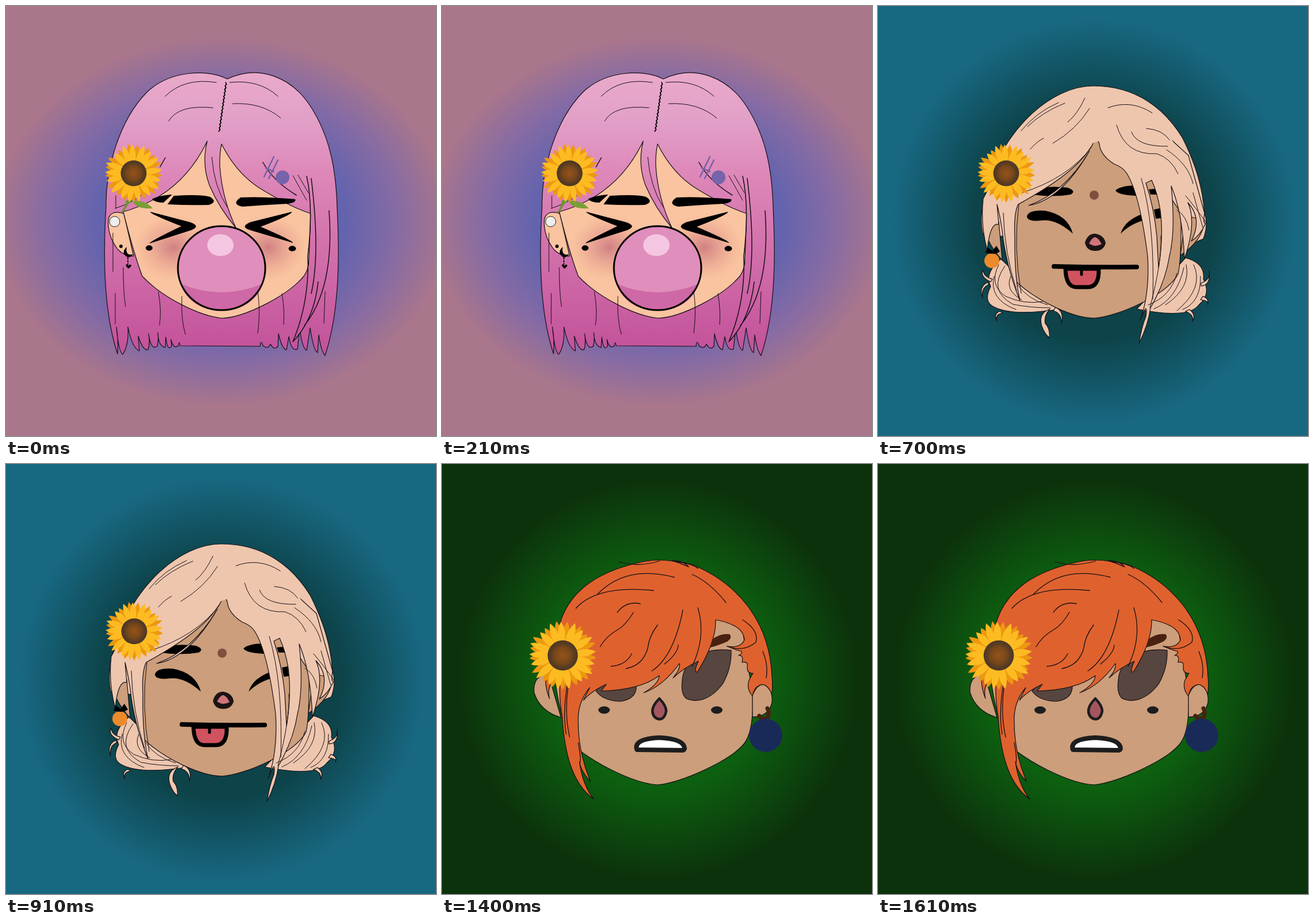
Recreate the animation shown at these times as an HTML page. Size 748 by 748 pixels, loop 1.75 s.

```html
<!DOCTYPE html>
<html lang="en">
<head>
<meta charset="utf-8">
<title>Flower portraits</title>
<style>
html, body { margin: 0; width: 100%; height: 100%; overflow: hidden; }
svg { display: block; width: 100vw; height: 100vh; }
.scene { visibility: hidden; animation: show 1750ms step-end infinite; animation-delay: calc(var(--i) * 350ms); }
@keyframes show { 0% { visibility: visible; } 20%, 100% { visibility: hidden; } }
path { stroke-linejoin: round; stroke-linecap: round; }
.o { stroke: #161016; stroke-width: 1.2; }
.b { stroke: #000; stroke-width: 2; }
.l { fill: none; stroke: #161016; stroke-width: 1; }
.m { fill: none; stroke: #000; stroke-width: 1.8; }
</style>
</head>
<body>
<svg viewBox="0 0 748 748">
<defs>
  <radialGradient id="bg0" gradientUnits="userSpaceOnUse" cx="0" cy="0" r="1" gradientTransform="translate(376 375) scale(395 322)">
    <stop offset=".54" stop-color="#6363ae"/><stop offset=".77" stop-color="#866ba4"/><stop offset="1" stop-color="#aa768b"/>
  </radialGradient>
  <radialGradient id="bg1" gradientUnits="userSpaceOnUse" cx="376" cy="375" r="372">
    <stop offset=".54" stop-color="#2b00d4"/><stop offset="1" stop-color="#8b0073"/>
  </radialGradient>
  <radialGradient id="bg2" gradientUnits="userSpaceOnUse" cx="376" cy="375" r="352">
    <stop offset=".58" stop-color="#0d4349"/><stop offset="1" stop-color="#186882"/>
  </radialGradient>
  <radialGradient id="bg3" gradientUnits="userSpaceOnUse" cx="376" cy="375" r="354">
    <stop offset=".48" stop-color="#9a3e67"/><stop offset="1" stop-color="#830118"/>
  </radialGradient>
  <radialGradient id="bg4" gradientUnits="userSpaceOnUse" cx="376" cy="375" r="348">
    <stop offset=".54" stop-color="#0d6010"/><stop offset="1" stop-color="#0c320c"/>
  </radialGradient>
  <linearGradient id="pink" gradientUnits="userSpaceOnUse" x1="0" y1="120" x2="0" y2="600">
    <stop offset="0" stop-color="#e9a9ca"/><stop offset=".16" stop-color="#e2a0c8"/><stop offset=".35" stop-color="#de88b9"/><stop offset="1" stop-color="#c3529a"/>
  </linearGradient>
  <linearGradient id="ash" gradientUnits="userSpaceOnUse" x1="0" y1="170" x2="0" y2="360">
    <stop offset="0" stop-color="#63564a"/><stop offset=".3" stop-color="#6e6054"/><stop offset="1" stop-color="#9a8271"/>
  </linearGradient>
  <radialGradient id="blush">
    <stop offset="0" stop-color="#c9747f" stop-opacity=".85"/><stop offset="1" stop-color="#e59a8b" stop-opacity="0"/>
  </radialGradient>
  <radialGradient id="seed">
    <stop offset="0" stop-color="#95531d"/><stop offset=".55" stop-color="#774719"/><stop offset=".75" stop-color="#5d3d20"/><stop offset="1" stop-color="#493727"/>
  </radialGradient>
  <g id="flower"><g id="petals"/><circle r="22.5" fill="url(#seed)"/></g>
  <path id="ear" class="o" d="M205 361Q182 354 178 371Q176 400 195 424Q207 436 222 435Z" fill="#fac4a0"/>
</defs>

<g class="scene" style="--i:0">
  <rect width="748" height="748" fill="url(#bg0)"/>
  <path class="o" fill="url(#pink)" d="M385 127C350 109 285 112 245 150C196 200 173 285 174 350C169 430 169 530 194 605Q196 580 192 558Q196 602 203 606Q214 590 212 558Q220 596 232 600L230 574Q238 600 247 598Q251 588 248 570Q252 600 263 592Q266 580 264 568Q265 592 277 594L278 576Q281 602 288 592L287 580Q291 598 300 591Q301 580 303 591L442 592Q443 578 447 591Q456 598 460 588Q466 600 473 592L474 570Q480 597 488 598L492 575Q496 601 507 597L511 560Q515 596 523 599L529 560Q535 600 542 603L544 572Q548 600 555 608C581 530 580 430 576 350C574 280 562 225 530 175C498 125 440 100 385 127Z"/>
  <use href="#ear"/>
  <path class="o" fill="#fac4a0" d="M204 358Q305 330 350 235Q340 275 354 312Q371 352 400 386Q376 335 372 280Q371 258 375 240Q400 290 440 316Q495 350 530 361L527 440Q527 458 518 470C490 504 415 542 376 543C340 540 275 510 237 470Q222 430 204 358Z"/>
  <ellipse cx="291" cy="420" rx="68" ry="58" fill="url(#blush)"/>
  <ellipse cx="456" cy="420" rx="66" ry="58" fill="url(#blush)"/>
  <path d="M254 336Q264 330 289 328L274 342Q260 342 254 336ZM292 330Q340 327 355 332Q369 341 353 346Q318 347 281 345ZM408 333Q445 331 503 336Q506 342 490 344Q450 346 411 349Q391 345 408 333ZM251 358L320 376Q340 383 322 390L250 413Q247 411 305 383Q249 361 251 358ZM497 358L425 376Q406 384 425 390L499 412Q501 409 443 384Q500 362 497 358Z"/>
  <ellipse cx="249" cy="421" rx="6" ry="4.7"/><ellipse cx="498" cy="422" rx="6.5" ry="4.7"/>
  <ellipse cx="375" cy="456" rx="76" ry="73" fill="#e08ebb"/>
  <path fill="#ce68a6" d="M303 483Q375 513 447 483Q430 529 375 529Q320 529 303 483Z"/>
  <ellipse cx="375" cy="456" rx="76" ry="73" fill="none" stroke="#000" stroke-width="3"/>
  <ellipse cx="373" cy="416" rx="23" ry="19" fill="#f5c6e1"/>
  <path fill="url(#pink)" d="M523 298Q535 350 528 430Q528 510 499 584Q535 545 548 490L563 355L535 300Z"/>
  <path class="l" d="M277 157Q310 124 366 133M283 200Q300 171 360 177M389 133Q440 127 473 157M394 170Q445 167 478 195M358 263Q362 315 385 350M190 500V553M186 395V462M204 455Q204 500 208 523M265 497Q271 530 267 555M306 505Q304 545 312 571M438 497Q443 530 438 569M480 500Q485 530 483 554M555 497L553 552M499 295L523 338M508 294L526 325M191 330V352M190 352Q215 344 235 330"/>
  <path class="l" style="stroke-width:1.5" d="M523 296Q535 350 525 435Q528 515 499 584Q536 545 543 480M531 300Q547 430 531 500M562 356Q572 490 519 556M277 264L268 280M447 272Q465 305 505 329"/>
  <path id="parting" class="m"/>
  <path fill="none" stroke="#765fa9" stroke-width="2.5" d="M466 262L449 297M473 268L457 300M452 282L466 288"/>
  <circle cx="481" cy="298" r="12" fill="#7663aa"/>
  <circle cx="189" cy="375" r="9" fill="#eee" stroke="#222"/>
  <circle cx="200" cy="418" r="3"/>
  <path d="M210 419Q199 429 211 437Q217 438 221 432Q207 435 210 419ZM213 457Q206 451 210 449Q213 450 213 452Q216 448 218 451Q218 453 213 457Z"/>
  <path class="m" stroke-dasharray="2 3" d="M212 438V449"/>
  <path fill="#6b9432" d="M209 338Q207 351 199 360L206 357Q210 346 220 338Z"/>
  <path fill="#7b9e37" d="M219 338Q226 354 255 352Q244 338 219 338Z"/>
  <use href="#flower" x="222" y="291"/>
</g>

<g class="scene" style="--i:1">
  <rect width="748" height="748" fill="url(#bg1)"/>
  <g fill="#662d91" class="b">
    <path d="M203 398Q163 407 146 500Q135 570 158 656Q149 600 152 550Q155 470 193 408Z"/>
    <path d="M574 410Q612 425 628 500Q646 580 617 652Q631 590 626 545Q615 450 583 413Z"/>
    <path d="M203 398Q168 430 163 520C160 580 158 640 170 690Q168 650 172 655Q173 705 184 720Q185 690 180 660L191 691Q205 640 197 682Q230 640 238 575Q242 600 235 623Q246 590 241 540L222 410Z"/>
    <path d="M574 410Q606 440 611 520C615 580 612 640 603 686Q605 660 602 655Q613 660 607 682Q604 655 600 650Q599 705 587 713Q592 690 584 670L578 686Q542 640 527 582Q520 600 528 622Q516 595 524 540L558 410Z"/>
    <path fill="#c1272d" d="M207 370Q190 376 194 396Q198 410 210 411ZM560 383Q576 379 576 394Q574 420 565 422Q557 415 560 383Z"/>
    <path d="M202 282C215 190 280 132 350 132Q378 131 393 136C440 126 505 155 535 205C562 255 577 315 571 378L562 390L210 390Z"/>
  </g>
  <path class="o" fill="#fac4a0" d="M237 366Q233 460 243 481C280 515 340 543 376 543C410 541 490 505 519 470Q527 460 527 430Q530 380 512 325L255 290Z"/>
  <path id="freckles" stroke="#d8a67f" stroke-width=".8"/>
  <path class="b" fill="#662d91" d="M253 289C268 235 320 198 380 198C450 200 495 245 511 325L508 363L497 360L486 332Q484 352 483 357L464 353Q460 342 450 337L460 353L441 349L422 328L429 347L401 346L392 323L389 345L364 345L361 319L354 345L345 347L347 328L338 348L331 344L329 349L308 350L312 335L307 350L296 350L300 336L289 355L292 337L272 358L277 342L269 357L239 363Q251 330 253 289Z"/>
  <path fill="#662d91" d="M253 289Q229 380 243 480Q258 530 290 569Q257 553 237 505Q248 565 276 591Q225 563 211 480L205 300Z"/>
  <path fill="#662d91" d="M511 320Q529 390 527 430Q528 450 519 480Q500 540 461 571Q505 555 526 505Q515 565 485 590Q540 560 555 470L562 385L535 280Z"/>
  <path class="m" d="M237 366Q230 430 243 480Q258 530 290 569Q257 553 237 505Q248 565 276 591Q225 563 213 470L207 412M511 325Q530 395 527 437Q528 455 519 480Q500 540 461 571Q505 555 526 505Q515 565 485 590Q540 560 555 470Q565 400 559 340Q555 320 546 313M524 302Q540 360 535 420M271 290Q250 320 246 362M221 383Q222 460 239 522M319 234L309 306M366 233Q352 265 348 310M387 237L393 308M436 237Q448 280 466 315M462 270Q475 325 487 335M471 270Q485 300 497 325"/>
  <path class="m" d="M190 420Q163 460 164 510Q165 555 183 610M205 480Q220 520 208 560Q200 610 191 655M215 540Q208 580 212 619M222 560L221 610M185 430Q165 550 166 600Q165 645 171 684M580 428Q594 500 580 610M558 478Q543 515 560 568Q571 620 578 672M552 540L553 620M542 560L543 598M536 480Q550 530 530 575"/>
  <path class="l" d="M323 148Q345 136 379 139M320 165Q345 154 377 155M323 191Q340 181 371 183M398 147Q425 144 442 150M395 168Q425 170 441 178"/>
  <path id="zip" class="m"/>
  <path d="M274 376L332 375Q337 421 315 436Q303 443 290 434Q270 417 274 376ZM424 372L482 373Q486 418 466 433Q451 441 437 431Q419 410 424 372Z"/>
  <path class="m" style="stroke-width:8" d="M258 379H278M261 371L276 377M479 376H497M482 374L492 368"/>
  <ellipse cx="290" cy="385" rx="10" ry="5" fill="#ddd"/><ellipse cx="438" cy="381" rx="10" ry="5" fill="#ddd"/>
  <path fill="#aa845a" d="M374 433Q383 441 382 448Q372 450 366 446Z"/>
  <path fill="#d5589a" stroke="#000" stroke-width="4.5" d="M348 488Q350 510 367 510Q385 509 387 488Z"/>
  <path class="m" style="stroke-width:5" d="M329 486Q380 483 439 486"/>
  <path class="l" d="M367 491Q369 497 366 502"/>
  <path class="o" fill="#c1272d" d="M466 248L497 231L474 260Z"/>
  <circle cx="458" cy="260" r="17" fill="#190e34"/>
  <use href="#flower" x="217" y="325"/>
</g>

<g class="scene" style="--i:2">
  <rect width="748" height="748" fill="url(#bg2)"/>
  <g class="o" fill="#eec6ae">
    <path d="M214 440Q184 465 196 488Q182 515 203 524Q235 540 318 527L245 470Z"/>
    <path d="M535 438Q570 448 566 475Q580 502 558 520Q540 545 450 527L515 460Z"/>
    <path d="M299 527Q278 535 285 557Q290 571 298 577Q300 562 291 552Q288 540 299 527ZM309 524Q325 532 319 552Q320 535 305 530ZM212 531Q200 536 207 548Q203 536 217 534ZM192 485Q179 490 182 508Q174 488 192 480ZM196 480Q176 470 183 459Q183 471 199 475ZM542 528Q554 537 547 549Q550 537 535 531ZM565 505Q577 509 573 519Q577 513 561 511ZM562 482Q579 476 576 461Q579 486 562 487Z"/>
    <path d="M182 395C175 360 184 330 200 290C225 215 300 139 375 139C450 139 500 180 530 230C555 280 565 320 568 360Q575 380 566 405L530 420L210 400Z"/>
  </g>
  <path class="o" fill="#cc9e7b" d="M210 375L187 374Q182 405 216 442ZM535 365L567 372Q568 405 526 434Z"/>
  <path class="o" fill="#cc9e7b" d="M217 380Q220 460 243 482C280 515 340 543 376 543C415 541 505 502 522 466Q528 440 527 360L440 230H378L217 340Z"/>
  <path d="M268 322Q290 311 330 316Q346 322 335 328Q305 333 268 328ZM413 321Q425 310 463 313V330Q420 331 413 321ZM259 366Q262 354 290 356Q330 363 339 396Q310 370 285 373Q260 376 259 366ZM422 396Q430 370 468 359V371Q440 378 422 396Z"/>
  <path class="o" fill="#eec6ae" d="M378 232C360 270 320 303 244 345Q236 360 238 400Q237 470 247 513Q222 450 216 390Q212 365 207 345L210 380Q195 375 190 425Q178 380 183 335L212 280L285 230L385 200L480 205L540 260L568 360Q565 380 570 378Q560 400 545 409Q565 370 539 342Q555 375 533 440Q530 360 510 313Q518 390 507 435Q500 480 474 525Q470 555 454 587Q458 560 466 540Q470 510 456 547Q473 500 469 435Q455 325 432 290Q425 280 411 275Q387 260 385 240Q381 227 378 232Z"/>
  <path fill="#eec6ae" d="M195 300L260 230L377 170L490 190L555 320L475 255L384 235L300 265L240 310Z"/>
  <path class="o" fill="#eec6ae" d="M368 252Q325 325 262 347Q318 338 368 252Z"/>
  <path class="o" fill="#cc9e7b" d="M466 308Q480 350 485 400L488 455Q497 400 491 355Q486 325 476 303Z"/>
  <path d="M471 319L482 318L485 328L474 328ZM480 354L490 352L492 369L483 370Z"/>
  <path class="l" d="M249 217Q275 185 314 168M260 210Q285 185 325 169M360 160Q347 188 330 202M368 178Q345 215 304 239M265 249Q276 236 288 230M400 177Q440 162 477 186M467 213Q495 215 507 233M441 219Q450 245 504 244M415 207Q430 260 485 257Q510 265 522 292M502 250Q540 275 548 309M371 246Q330 300 250 325"/>
  <path class="l" d="M245 345Q235 420 249 500M218 360Q220 430 241 495M458 300Q482 380 478 510M492 400Q495 440 473 525M520 355Q537 365 541 390M535 330Q552 350 571 377M548 325L565 385M210 450Q192 485 222 505Q255 520 287 514M221 452Q190 495 235 519Q265 525 300 525M231 470Q220 495 250 511M202 470Q192 510 240 528M243 485Q260 510 295 520M520 465Q510 505 470 520M536 450Q545 490 500 520M549 450Q568 490 520 530M532 455Q520 510 480 527M561 470Q562 515 530 528"/>
  <circle cx="376" cy="329" r="8" fill="#80503f"/>
  <path fill="#1b1414" d="M360 412Q364 396 378 396Q394 399 396 413Q392 426 378 426Q363 426 360 412Z"/>
  <path fill="#cf747a" d="M367 413Q373 402 378 402Q383 403 389 414Q378 421 367 413Z"/>
  <path fill="#d15360" stroke="#000" stroke-width="7" d="M326 457Q327 489 345 489H366Q385 488 384 457Z"/>
  <path class="m" style="stroke-width:8" d="M306 453Q380 455 450 454"/>
  <path class="m" style="stroke-width:5" d="M354 458V467"/>
  <circle cx="198" cy="443" r="13" fill="#ec8a2c"/>
  <path d="M187 429L191 420L199 426L206 417L212 427Q204 434 187 429Z"/>
  <use href="#flower" x="223" y="291"/>
</g>

<g class="scene" style="--i:3">
  <rect width="748" height="748" fill="url(#bg3)"/>
  <path class="o" fill="#9c8372" d="M372 128C300 124 245 165 215 220C185 270 173 320 172 370C156 460 160 515 180 560Q200 615 232 640Q211 595 205 560Q220 592 245 604L227 565Q240 578 250 577L241 548Q250 560 258 560L254 540Q264 550 269 549L262 527Q273 540 278 537L275 520Q285 527 298 519L320 500H440L458 518Q468 523 471 512Q472 535 480 539L481 520Q486 545 492 551L496 530Q498 550 505 556L509 545Q508 570 515 577L526 550Q523 592 502 605Q522 600 531 575Q541 595 520 636Q560 595 570 530Q590 430 577 330C570 290 545 240 520 205C480 150 435 129 372 128Z"/>
  <use href="#ear"/>
  <path class="o" fill="#fac4a0" d="M203 358Q220 435 237 470C275 510 340 542 376 543C415 541 490 506 519 470Q527 458 526 435L520 355L480 280L275 245L245 330Z"/>
  <path fill="#362c26" d="M247 341Q272 338 291 324Q303 320 305 329Q295 345 265 347Q243 348 247 341ZM412 317Q430 325 450 346L429 341Z"/>
  <path fill="url(#ash)" stroke="#4e443b" stroke-width=".8" d="M186 366Q190 300 225 241C260 190 310 171 355 171C430 172 490 230 504 285Q516 320 520 360Q502 335 482 300Q493 335 493 363Q475 340 462 317Q482 345 484 359Q450 345 427 309Q440 335 448 345Q410 330 384 277Q400 325 434 346Q420 347 403 341L409 350Q370 330 341 290Q350 315 373 341Q340 325 309 274Q330 325 365 353Q295 340 276 249Q275 290 245 330Q230 352 186 366Z"/>
  <path class="l" style="stroke-width:1.5" d="M504 285Q525 365 526 435Q527 470 515 510M540 240Q565 285 577 330M555 330Q565 450 530 555M569 390Q560 480 525 563M535 310Q560 400 520 540M551 375Q552 470 507 549M577 385Q615 510 562 625M530 435Q515 500 495 530M521 470L493 530M178 395Q165 500 202 586M172 375Q160 500 177 582M206 440Q195 520 213 575M191 420Q180 510 216 604M228 470L229 543M236 480V545M215 440Q217 520 227 565M245 480Q250 510 260 530M255 490L270 533M185 320Q177 350 174 385"/>
  <path id="heart" fill="#362c26" d="M292 423Q250 396 256 374Q266 350 292 370Q320 350 329 376Q331 395 292 423Z"/>
  <use href="#heart" x="157"/>
  <path fill="#f1b0c6" stroke="#a98084" d="M357 442Q356 425 374 423Q391 425 392 441Q378 445 357 442Z"/>
  <path class="m" style="stroke-width:2.5" d="M299 475Q309 489 329 486M425 485Q449 492 458 474"/>
  <path class="m" style="stroke-width:5" d="M326 486C336 469 348 470 358 480Q380 501 397 481Q410 464 421 475Q424 485 434 486"/>
  <rect x="179" y="377" width="6" height="6" rx="1" fill="#ee7b43" stroke="#432" stroke-width=".8"/>
  <g fill="#eba5c0" stroke="#432" stroke-width=".8"><circle cx="186" cy="404" r="1"/><circle cx="190" cy="408" r="1.8"/><circle cx="196" cy="414" r="2.5"/></g>
  <circle cx="209" cy="420" r="8" fill="#dba0bd"/>
  <use href="#flower" x="223" y="291"/>
</g>

<g class="scene" style="--i:4">
  <rect width="748" height="748" fill="url(#bg4)"/>
  <g class="o" fill="#cc9e7b">
    <path d="M185 365Q158 368 160 397Q170 430 207 441Z"/>
    <path d="M196 370Q208 470 243 501C280 528 340 557 376 558C415 555 500 517 525 487Q543 465 540 400L520 270L300 230Z"/>
  </g>
  <path class="o" fill="#57453f" d="M418 376C420 345 450 318 503 324Q504 355 488 383C465 413 440 415 425 408Q415 400 418 376ZM268 395Q280 412 310 413Q339 409 338 385L300 350Z"/>
  <path class="o" fill="#df622e" d="M202 290C215 225 265 193 325 176Q355 167 378 167Q405 168 435 175C510 205 570 270 574 370Q576 390 573 402Q567 380 552 385Q542 390 540 404Q529 390 534 376L541 364Q530 365 531 352Q533 343 522 345Q525 332 516 333Q523 329 521 326Q510 323 496 317Q520 321 526 306Q525 280 476 271Q477 310 444 362Q437 362 446 343Q420 355 402 372Q415 357 413 347Q385 386 351 398Q377 383 378 368Q345 393 277 395L286 383Q260 395 246 411L257 389Q235 415 237 450Q237 500 258 552Q242 535 239 518Q245 560 264 583C225 555 213 500 209 440Q204 410 205 385L194 376Q182 390 187 408Q175 380 184 350Z"/>
  <path fill="#492110" d="M470 305Q485 294 500 296Q506 302 496 309Q480 316 467 319Z"/>
  <path class="l" style="stroke-width:1.3" d="M270 227Q320 175 404 197M233 251Q270 210 368 220M305 258Q320 238 345 243M435 192Q465 205 494 241M308 170Q340 180 378 169M400 168Q420 168 429 179Q415 172 400 168Q440 174 445 182M333 258Q320 280 306 288Q285 300 275 318M320 356Q350 350 358 320Q360 300 375 280M294 352Q320 350 330 330M365 360Q403 335 419 254M387 348Q410 330 411 315M445 250Q460 300 435 352M523 271Q552 290 546 310Q525 328 496 317M558 326Q568 350 564 372M219 390Q213 435 222 475M220 372Q209 430 216 470M237 485Q242 510 240 520"/>
  <path class="o" fill="#cc9e7b" d="M540 403Q548 382 560 384Q576 392 574 415Q568 440 540 440Z"/>
  <path class="m" style="stroke:#492110;stroke-width:7" d="M552 438Q558 448 567 440Q570 432 566 425"/>
  <circle cx="563" cy="472" r="29" fill="#192a59"/>
  <ellipse cx="282" cy="428" rx="10" ry="6.5" fill="#1d1d1d"/><ellipse cx="478" cy="428" rx="10" ry="6.5" fill="#1d1d1d"/>
  <path fill="#a45660" stroke="#1d1d1d" stroke-width="4.5" d="M378 408Q390 420 390 430Q387 444 378 444Q367 442 366 430Q366 420 378 408Z"/>
  <path fill="#fff" stroke="#1d1d1d" stroke-width="8" d="M339 497Q333 478 378 476Q421 478 422 495Q421 498 418 498Z"/>
  <use href="#flower" transform="translate(210 333) scale(1.17)"/>
</g>
</svg>
<script>
const byId = id => document.getElementById(id);

// Two rings of petals with slightly uneven lengths
const ring = (count, turn, length, fill) => Array.from({ length: count }, (_, i) => {
  const tip = length + 2 * Math.sin(i * 2.4);
  const angle = turn + i * 360 / count + 3 * Math.sin(i * 1.7);
  return `<path fill="${fill}" transform="rotate(${angle})" d="M-3 -18Q-9 -36 0 ${-tip}Q9 -36 3 -18Z"/>`;
}).join('');
byId('petals').innerHTML = ring(17, 8, 50.5, '#ed9810') + ring(17, -3, 50, '#fdbb22');

const zigzag = (x1, y1, x2, y2, steps, size) => 'M' + Array.from({ length: steps + 1 }, (_, i) => {
  const t = i / steps;
  return `${x1 + (x2 - x1) * t + (i % 2 ? size : -size)} ${y1 + (y2 - y1) * t}`;
}).join('L');
byId('parting').setAttribute('d', zigzag(383, 133, 371, 218, 28, .9));
byId('zip').setAttribute('d', zigzag(393, 136, 387, 197, 26, 2.2));

// Seeded freckles along a band that rises towards the nose
let seed = 7;
const random = () => (seed = seed * 16807 % 2147483647) / 2147483647;
let marks = '';
for (let i = 0; i < 800; i++) {
  const x = 260 + 236 * random();
  const y = 448 - 22 * Math.exp(-(((x - 376) / 45) ** 2)) + 36 * (random() - .5);
  marks += `M${x} ${y}l${2 * random()} ${2 * random() - 1}`;
}
byId('freckles').setAttribute('d', marks);
</script>
</body>
</html>
```
